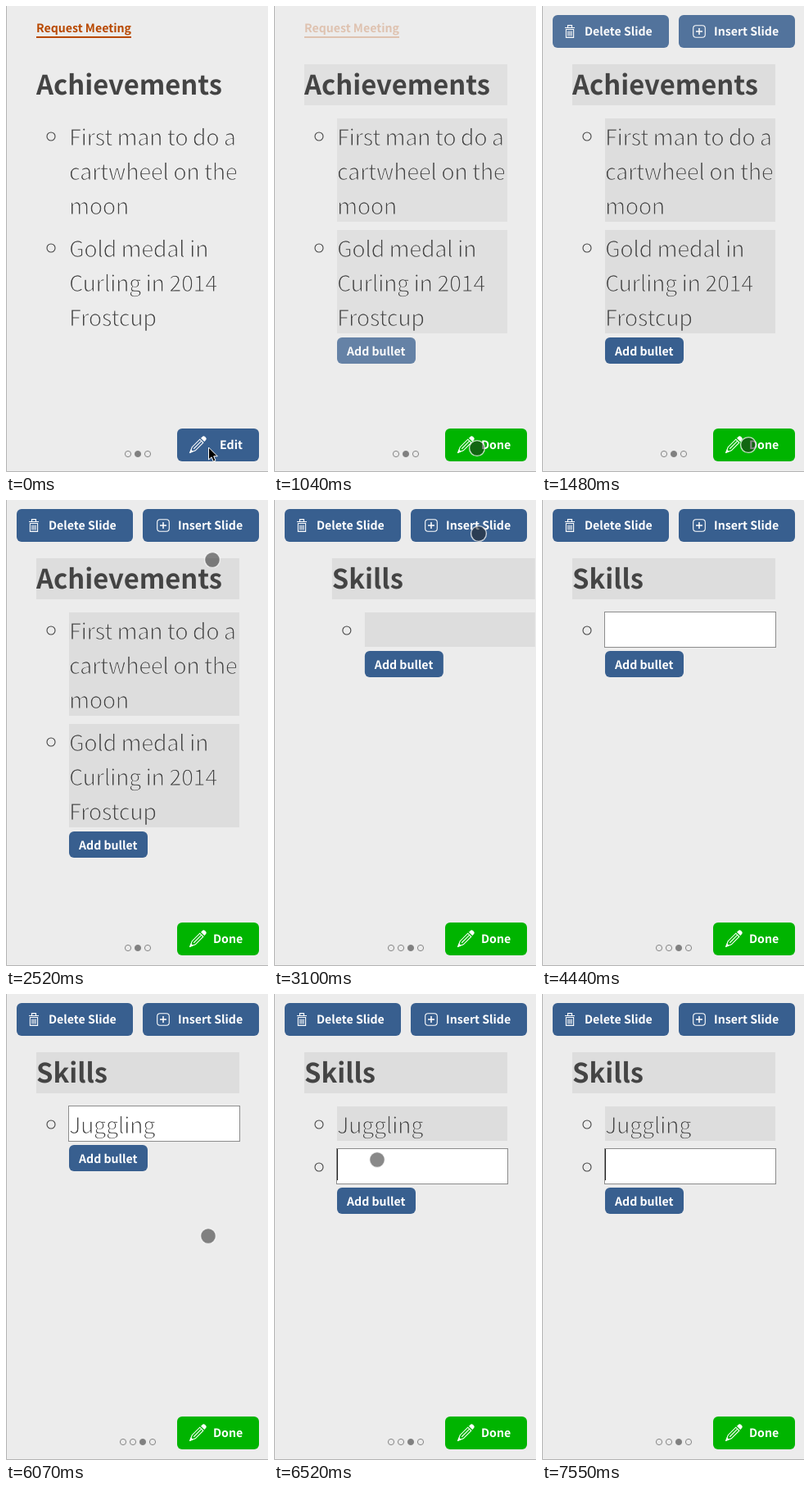
Write an HTML page that moves like this. It is 320 px wide and 568 px high and loops after 8000 ms.

```html
<!DOCTYPE html>
<html lang="en">
<head>
<meta charset="utf-8">
<title>Slide editor</title>
<style>
  html, body { margin: 0; width: 100%; height: 100%; overflow: hidden; background: #ececec; }
  svg { display: block; width: 100%; height: 100%; }
  text {
    font-family: "Noto Sans CJK JP", "Noto Sans CJK SC", "Noto Sans", sans-serif;
    text-rendering: geometricPrecision;
    white-space: pre;
  }
  .title { font-size: 32.75px; font-weight: 700; fill: #444; }
  /* The red outline is cut away by the filter, leaving thin strokes. */
  .item {
    font-size: 27.2px; font-weight: 400; letter-spacing: -.47px;
    fill: #000; stroke: #f00; stroke-width: 1; filter: url(#thin);
  }
  .label { font-size: 14.15px; font-weight: 700; fill: #fff; }
  .link { fill: #b84800; }
  .page { fill: #ececec; }
  .mark { fill: #ddd; }
  .blue { fill: #385f8f; }
  .green { fill: #00b400; }
  .ring { fill: none; stroke: #444; stroke-width: 1.1; }
  .icon { fill: none; stroke: #fff; stroke-width: 1.1; }
  .icon .solid { fill: #fff; }
  .field { fill: #fff; stroke: #8c8c8c; }
  .dot { fill: none; stroke: #858585; }
  .dot.on { fill: #808080; }
</style>
</head>
<body>
<svg id="stage" viewBox="0 0 320 568"></svg>
<script>
const STEPS = 54, LOOP = 8000;

const box = (cls, x, y, w, h, r = 0) =>
  `<rect class="${cls}" x="${x}" y="${y}" width="${w}" height="${h}" rx="${r}"/>`;
const text = (cls, x, y, str, id = '') =>
  `<text class="${cls}" x="${x}" y="${y}"${id && ` id="${id}"`}>${str}</text>`;
const ring = y => `<circle class="ring" cx="55" cy="${y}" r="5"/>`;
const group = (id, content) => `<g id="${id}">${content}</g>`;
const lines = (y, ...rows) => rows.map((row, i) => text('item', 77, y + 42 * i, row)).join('');
const addBullet = y => box('blue', 77, y, 96, 32, 6) + text('label', 89, y + 22, 'Add bullet');

const thin = `<filter id="thin" color-interpolation-filters="sRGB"><feColorMatrix
  values="0 0 0 0 .267  0 0 0 0 .267  0 0 0 0 .267  -1 0 0 1 0"/></filter>`;
const pencil = `<g class="icon" transform="translate(224.3 544.7) rotate(-45)">
  <path d="M1 0L7-2.9H20.5V2.9H7ZM7 0H20.5"/>
  <path class="solid" d="M0 0L4-1.6V1.6ZM22.6-2.8H24.5Q27-2.8 27 0T24.5 2.8H22.6Z" stroke-width=".6"/></g>`;
const trash = `<g class="icon"><path d="M28 26.5H40M31.5 26V23.6H36.5V26M29.4 28.5H38.6V38.4H29.4Z
  M31.9 30.5V36.5M34 30.5V36.5M36.1 30.5V36.5"/></g>`;
const plus = `<g class="icon"><rect x="184.7" y="23.7" width="14.6" height="14.6" rx="3.5"/>
  <path d="M192 27V35M188 31H196" style="stroke-width:1.5"/></g>`;
const actionButton = (id, color, x, label) =>
  group(id, box(color, 209, 515, 100, 40, 6) + pencil + text('label', x, 540, label));

const dots = (id, count, active) => group(id, Array.from({length: count}, (_, i) =>
  `<circle class="dot${i === active ? ' on' : ''}" cx="${167 - 6 * count + 12 * i}" cy="546" r="3.6"/>`).join(''));

const achievements =
  group('marks', box('mark', 37, 71, 248, 50) + box('mark', 77, 137, 208, 126) +
    box('mark', 77, 273, 208, 126) + addBullet(404)) +
  group('link', text('label link', 37, 32, 'Request Meeting') + box('link', 37, 37, 116, 2)) +
  text('title', 37, 108, 'Achievements') +
  ring(159) + lines(169.5, 'First man to do a', 'cartwheel on the', 'moon') +
  ring(295) + lines(305.5, 'Gold medal in', 'Curling in 2014', 'Frostcup');

const skills =
  box('mark', 37, 71, 248, 50) + text('title', 37, 108, 'Skills') +
  ring(159) + box('mark', 77, 137, 208, 42) +
  group('second', ring(211)) +
  group('focus', box('field', 76.5, 136.5, 209, 43)) +
  text('item', 77, 169.5, '', 'typed') +
  group('add', addBullet(184)) +
  '<rect id="caret" width="1" height="38" fill="#222"/>';

document.getElementById('stage').innerHTML =
  thin + box('page', 0, 0, 320, 568) +
  group('pages', achievements + `<g transform="translate(320)">${skills}</g>`) +
  group('tools',
    box('blue', 13, 11, 142, 40, 6) + trash + text('label', 52, 36, 'Delete Slide') +
    box('blue', 167, 11, 142, 40, 6) + plus + text('label', 210, 36, 'Insert Slide')) +
  dots('dots3', 3, 1) + dots('dots4', 4, 2) +
  actionButton('edit', 'blue', 261, 'Edit') + actionButton('done', 'green', 253, 'Done') +
  '<path d="M.5 0V567.5H320" fill="none" stroke="#b4b4b4"/>' +
  `<path id="arrow" d="M247.5 538V553L251 549.8L253.3 555.2L256 554L253.7 548.8H258.3Z"
    stroke="#fff" stroke-linejoin="round"/>` +
  `<circle id="touch" r="9.4" fill="#202020" fill-opacity=".53" stroke="#fff" stroke-opacity=".75" stroke-width="1.4"/>`;

const $ = id => document.getElementById(id);
const show = (id, on) => { $(id).style.display = on ? '' : 'none'; };
const clamp = v => Math.min(1, Math.max(0, v));

// Touch path: step, x, y, opacity
const path = [
  [1, 248, 539, .6], [2, 248, 539, 1], [7, 248, 539, 1], [8, 252, 535, 1],
  [10, 252, 535, 1], [13, 252, 535, 0], [14, 248, 540, 0], [15, 248, 540, .5],
  [16, 240, 490, 1], [17, 252, 73, 1], [18, 250, 41, 1], [21, 250, 41, 1],
  [22, 248, 49, 1], [23, 190, 102, 1], [24, 152, 140, 1], [25, 140, 158, 1],
  [26, 140, 158, 1], [28, 140, 158, 0], [40, 247, 295, 0], [41, 247, 295, 1],
  [42, 205, 252, 1], [43, 140, 212, 1], [44, 126, 202, 1], [45, 126, 202, 1],
  [47, 126, 202, 0], [STEPS, 126, 202, 0]
];

function touchAt(step) {
  const next = Math.max(1, path.findIndex(p => p[0] >= step));
  const a = path[next - 1], b = path[next];
  const u = clamp((step - a[0]) / (b[0] - a[0]));
  return a.map((v, i) => v + (b[i] - v) * u);
}

function render(step) {
  const editing = clamp((step - 4) / 4);
  $('marks').style.opacity = editing;
  $('link').style.opacity = 1 - editing;
  show('edit', step < 5);
  show('done', step >= 5);
  $('tools').style.opacity = step < 10 ? 0 : clamp(.85 + .05 * (step - 10));

  const left = step < 19 ? 320 : step < 23 ? 320 * .473 ** (step - 18) : 0;
  $('pages').setAttribute('transform', `translate(${left - 320})`);
  show('dots3', step < 19);
  show('dots4', step >= 19);

  const second = step >= 44;
  const shift = second ? 52 : 0;
  const count = step < 32 ? 0 : step < 38 ? step - 31 : 8;
  $('typed').textContent = 'Juggling'.slice(0, count);
  show('second', second);
  show('focus', step >= 26);
  $('focus').setAttribute('transform', `translate(0 ${shift})`);
  $('add').setAttribute('transform', `translate(0 ${shift})`);

  const caretOn = [[26, 30], [32, 41], [44, 48], [51, STEPS]].some(([a, b]) => step >= a && step < b);
  show('caret', caretOn);
  $('caret').setAttribute('x', 77 + (second || !count ? 0 : Math.round($('typed').getComputedTextLength())));
  $('caret').setAttribute('y', 137 + shift);

  const [, x, y, alpha] = touchAt(step);
  show('arrow', step < 1);
  $('touch').style.opacity = step < 1 ? 0 : alpha;
  $('touch').setAttribute('transform', `translate(${x} ${y})`);
}

const start = performance.now();
function tick() {
  const time = (performance.now() - start) % LOOP;
  render(Math.min(STEPS - 1, Math.floor((time + 12) * STEPS / LOOP)));
  requestAnimationFrame(tick);
}
tick();
</script>
</body>
</html>
```
